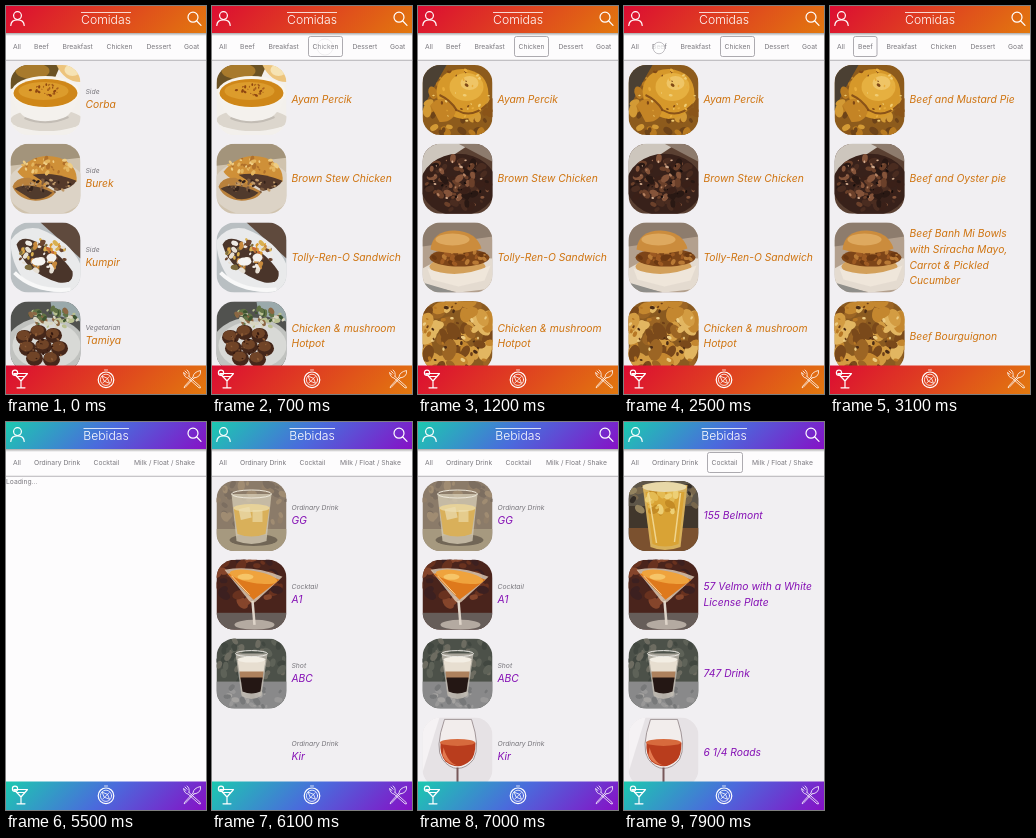
These frames come from a looping animation (200 by 388 pixels, 8000 ms). An HTML page:

```html
<!DOCTYPE html>
<html lang="es">
<head>
<meta charset="utf-8">
<title>Comidas y bebidas</title>
<style>
html, body { margin: 0; width: 100%; height: 100%; overflow: hidden; background: #fdfcfd; }
svg { display: block; width: 100%; height: 100%; }
text { font-family: Inter, Lato, sans-serif; }
.cat { font-size: 6.75px; fill: #7b797f; }
.kind { font-size: 6.8px; font-style: italic; fill: #77757b; }
.name { font-size: 10.3px; font-style: italic; }
.food .name { fill: #cf7410; }
.drink .name { fill: #8510b5; }
.title { font-size: 12.2px; font-weight: 300; fill: #fff; text-anchor: middle; }
.icon { fill: none; stroke: #fff; stroke-width: 1.2; stroke-linecap: round; stroke-linejoin: round; }
.fine { stroke-width: .8; }
</style>
</head>
<body>
<svg id="stage" viewBox="0 0 200 388"></svg>
<script>
const LOOP = 8000;
const stage = document.getElementById('stage');

// Drawing helpers
const oval = (x, y, rx, ry, fill, extra = '') =>
  `<ellipse cx="${x}" cy="${y}" rx="${rx}" ry="${ry}" fill="${fill}" ${extra}/>`;
const shape = (d, fill, extra = '') => `<path d="${d}" fill="${fill}" ${extra}/>`;
const line = (d, color, width = 1) => shape(d, 'none', `stroke="${color}" stroke-width="${width}"`);
const box = (x, y, w, h, fill, extra = '') =>
  `<rect x="${x}" y="${y}" width="${w}" height="${h}" fill="${fill}" ${extra}/>`;
const label = (cls, x, y, text) => `<text class="${cls}" x="${x}" y="${y}">${text.replace(/&/g, '&amp;')}</text>`;

function random(seed) {
  return () => (seed = (seed * 16807) % 2147483647) / 2147483647;
}

// Seeded bits of food scattered inside an ellipse
function scatter(count, x, y, rx, ry, size, colors, seed = 7) {
  const rnd = random(seed * 7919);
  let out = '';
  for (let i = 0; i < count; i++) {
    const a = rnd() * Math.PI * 2, d = Math.sqrt(rnd()), s = size * (.5 + rnd());
    const cx = (x + Math.cos(a) * d * rx).toFixed(1), cy = (y + Math.sin(a) * d * ry).toFixed(1);
    out += oval(cx, cy, s, s * .65, colors[i % colors.length],
      `transform="rotate(${Math.round(rnd() * 180)} ${cx} ${cy})"`);
  }
  return out;
}

// Thumbnails, each 70 by 70
const pictures = {
  soup: () => box(0, 0, 70, 70, '#f3f0ec') + shape('M0 0H50L44 14L0 24Z', '#6b5224') +
    oval(22, 6, 17, 8, '#a87a2c') + shape('M46 0H70V17Q54 17 46 0Z', '#edc47c') + oval(62, 5, 8, 6, '#f6e3b4') +
    oval(36, 55, 36, 11, '#dcd6cd') + shape('M1 27Q6 58 35 58Q63 58 69 27Z', '#f4f1ed') +
    oval(35, 27, 34, 16, '#f8f4ec') + oval(35, 28, 32, 14, '#cf8718') + oval(33, 26, 25, 9, '#dc9c2c') +
    scatter(26, 34, 25, 15, 6, 1.3, ['#8d4510', '#a9611a'], 3) + line('M14 53Q36 62 58 52', '#c3bdb5', 2),
  burek: () => box(0, 0, 70, 70, '#d0c3ae') + shape('M0 0H70V14L0 22Z', '#a3947b') +
    oval(36, 44, 40, 28, '#dcd3c6') +
    shape('M7 28Q24 7 49 14Q68 22 66 38L34 42Q14 38 7 28Z', '#cf9038') +
    shape('M22 31Q42 27 66 37Q62 45 47 47Z', '#54392a') +
    shape('M2 43Q5 33 19 34L45 48Q42 56 25 57Q8 56 2 43Z', '#b9813c') +
    shape('M4 45Q18 37 42 49Q33 57 20 55Z', '#503a2c') +
    scatter(34, 36, 22, 25, 8, 2.2, ['#e4b55f', '#b0702a', '#efcd83'], 5) +
    scatter(34, 36, 42, 25, 7, 1.8, ['#7c5a3e', '#35231b', '#c09a6a'], 8),
  kumpir: () => box(0, 0, 70, 70, '#b9bfc2') + shape('M30 0H70V36Z', '#5f4a3d') +
    shape('M0 18Q10 3 28 6Q60 18 70 42V66Q40 76 14 58Q0 40 0 18Z', '#e9eaeb') +
    shape('M6 22Q10 14 20 17Q48 27 62 49Q64 62 48 60Q14 50 6 22Z', '#4a352a') +
    scatter(65, 33, 33, 24, 16, 2.5, ['#c98a3c', '#e7e0d4', '#7b6a3d', '#d9b050', '#6b4630', '#efebe4'], 9) +
    oval(28, 39, 7, 4, '#f5f4f1') + oval(41, 35, 5, 4, '#f2f0ec') +
    scatter(10, 42, 24, 8, 7, 2, ['#c96b35', '#db9c2d'], 4) + line('M4 50Q24 70 60 67', '#f8f8f8', 4),
  falafel: () => box(0, 0, 70, 70, '#51524f') + shape('M40 0H70V20L42 13Z', '#9aa9ab') +
    oval(35, 45, 40, 29, '#c0c2bf') + oval(36, 44, 34, 24, '#d8d9d6') +
    scatter(60, 43, 16, 25, 10, 2.8, ['#627345', '#3f5531', '#b9c090', '#d8d5c0', '#8b6743'], 12) +
    [[14, 36], [28, 31], [43, 34], [17, 47], [33, 45], [49, 47], [24, 57], [41, 58]].map(([x, y]) =>
      oval(x, y, 8.5, 7.5, '#45271a') + oval(x - 1, y - 2, 6.5, 5, '#704427')).join('') +
    scatter(35, 32, 45, 24, 15, 1.2, ['#8c5b36', '#35190f'], 2),
  roast: () => box(0, 0, 70, 70, '#8d5b1c') + shape('M0 0H24L8 28L0 46Z', '#4b4033') +
    scatter(50, 36, 42, 38, 34, 5, ['#b87a20', '#8a5418', '#d39a35', '#6d4318'], 10) +
    shape('M14 26Q16 5 40 4Q66 6 66 30Q62 52 40 54Q16 50 14 26Z', '#d6982a') +
    oval(44, 22, 17, 14, '#e6b040') + oval(47, 18, 9, 7, '#efc566') +
    shape('M8 40Q20 26 34 43Q32 58 17 57Z', '#c48425') + line('M17 30Q28 35 34 45Q49 54 64 40', '#8a5318', 2) +
    scatter(34, 38, 30, 30, 28, 1.5, ['#f0cd74', '#7f4815', '#e9ad3b'], 19),
  stew: () => box(0, 0, 70, 70, '#5a4032') + shape('M0 0H48L0 32Z', '#cdc6bd') + shape('M36 0H70V18Z', '#8d7b6d') +
    oval(36, 41, 38, 31, '#38211a') +
    scatter(95, 36, 40, 33, 27, 3.6, ['#4a2c20', '#6b402a', '#291813', '#85543a', '#3a2018'], 15) +
    scatter(28, 34, 36, 28, 22, 1.3, ['#b58262', '#d0a98c', '#160d0b'], 6),
  sandwich: () => box(0, 0, 70, 70, '#b3a08e') + shape('M0 0H70V14L0 24Z', '#8d7c6d') +
    shape('M0 46L22 34L70 36V66L36 70L0 62Z', '#e4dbd0') + shape('M0 60L34 70H0Z', '#8f8e8a') +
    oval(35, 44, 28, 9, '#d3a05a') + oval(37, 35, 30, 9, '#7d4518') +
    scatter(30, 37, 35, 28, 7, 2.8, ['#9d5a22', '#6b3812', '#b97a35'], 16) +
    shape('M8 27Q10 8 32 8Q54 9 59 26Q36 35 8 27Z', '#cb8c3d') + oval(30, 17, 17, 6, '#dea95f') +
    shape('M5 46Q34 58 68 43L62 58L36 64L9 57Z', '#efe6da'),
  hotpot: () => box(0, 0, 70, 70, '#8a5a20') +
    scatter(65, 35, 35, 40, 38, 8, ['#d39c42', '#9c6524', '#e2b661', '#7a491a', '#c4872f'], 31) +
    scatter(45, 35, 35, 38, 38, 2, ['#6d3f17', '#eccb82', '#b87825', '#4b2b14'], 17),
  crust: () => box(0, 0, 70, 70, '#737473') + shape('M0 40L40 70H0Z', '#3c5264') + box(0, 0, 70, 10, '#a9b0b3') +
    shape('M0 14Q25 -2 70 8V46Q50 67 20 57L0 40Z', '#dcdad5') +
    shape('M0 14Q32 -1 70 12V31Q43 38 22 34L0 36Z', '#d3a869') +
    scatter(50, 34, 20, 36, 13, 3.2, ['#e4c591', '#c09050', '#eed7ad'], 21) +
    oval(46, 38, 20, 11, '#35241e') +
    scatter(30, 46, 39, 18, 9, 2.6, ['#62402f', '#27170f', '#8a5f46', '#94513a'], 11) +
    line('M20 61Q46 63 68 46', '#eceae6', 4),
  pie: () => box(0, 0, 70, 70, '#66594c') + shape('M0 0H70V14L0 20Z', '#b39d80') +
    oval(35, 37, 35, 31, '#8f673a') + oval(35, 35, 33, 28, '#cd9c57') + oval(35, 34, 29, 24, '#bd8845') +
    scatter(40, 33, 31, 27, 22, 2.3, ['#cda25f', '#b07a38'], 3) +
    shape('M36 30L66 45Q58 60 39 64Z', '#3b251c') +
    scatter(24, 49, 49, 9, 11, 2.3, ['#5d3826', '#7a4f38', '#24140f'], 14) + line('M36 30L66 45M36 30L39 64', '#d8b273', 1.5),
  bowl: () => box(0, 0, 70, 70, '#d3cfc8') + shape('M0 0H50L0 24Z', '#c2995c') +
    scatter(20, 28, 6, 26, 6, 3, ['#dc9b35', '#8d6a38', '#e9d5ac'], 13) +
    oval(36, 42, 37, 28, '#4c6687') + oval(36, 41, 34, 25, '#e3dfd8') +
    scatter(55, 31, 32, 23, 14, 2.8, ['#6d4830', '#8e5f3d', '#40291d', '#c69a6d', '#efe7da'], 5) +
    scatter(34, 18, 36, 13, 9, 2.5, ['#d5803b', '#e6a45a', '#b8622c'], 20) +
    scatter(26, 55, 44, 11, 13, 3.6, ['#a7b37a', '#d5d9b2', '#78915a'], 8) +
    scatter(45, 33, 54, 18, 8, 2, ['#f7f4ee', '#d5cdbf'], 23),
  casserole: () => box(0, 0, 70, 70, '#54443a') + shape('M0 46L20 70H0Z', '#c3b29b') + shape('M0 0H34L0 18Z', '#9c8468') +
    oval(54, 8, 13, 7, '#a98054') + shape('M3 32Q5 66 35 67Q66 66 68 32Z', '#d0c3b1') +
    oval(35, 34, 33, 24, '#e0d5c4') + oval(35, 34, 29, 20, '#3f271c') +
    scatter(60, 35, 34, 27, 18, 3.2, ['#62402c', '#2b1a13', '#83583a', '#b58e60', '#4a2c1f'], 25) +
    [[24, 27], [44, 24], [48, 39]].map(([x, y]) => oval(x, y, 4, 5, '#cda668')).join(''),
  tumbler: () => box(0, 0, 70, 70, '#8b7b69') + scatter(45, 35, 24, 38, 25, 4, ['#927f69', '#7c6e60', '#a08c72'], 2) +
    box(0, 48, 70, 22, '#a6997f') + oval(37, 59, 24, 6, '#716656') +
    shape('M15 13H55L50 60Q35 66 20 60Z', '#d4cab3', 'opacity=".8"') + shape('M17 26H53L49 53Q35 58 21 53Z', '#d9b05a') +
    oval(35, 27, 18, 4, '#e7d299') + box(23, 27, 11, 11, '#eddfb3', 'opacity=".7" transform="rotate(-12 28 32)"') +
    box(36, 29, 10, 12, '#eee0af', 'opacity=".6"') + oval(35, 13, 20, 4, 'none', 'stroke="#eee8da"'),
  martini: () => box(0, 0, 70, 70, '#4a241c') + scatter(36, 34, 20, 38, 24, 5, ['#69321f', '#3c2020', '#85452b'], 18) +
    box(0, 53, 70, 17, '#665d59') + oval(38, 65, 20, 5, '#b4aaa1') + line('M36 41L38 65', '#ded4c9', 2.5) +
    shape('M8 10Q37 5 66 17L39 42Q35 45 31 39Z', '#eadbc4', 'opacity=".75"') +
    shape('M11 14Q37 9 63 20L37 40Z', '#de791c') + oval(37, 17, 24, 6, '#efa33d', 'transform="rotate(10 37 17)"') +
    oval(29, 17, 8, 3, '#f6c568') + line('M15 16L33 35', '#f7d29b'),
  shot: () => box(0, 0, 70, 70, '#4c5149') + scatter(48, 35, 22, 38, 23, 4, ['#5e6258', '#414740', '#6d6c61'], 22) +
    box(0, 43, 70, 27, '#89898a') + scatter(32, 35, 57, 36, 12, 3, ['#999898', '#777879', '#a5a3a1'], 4) +
    shape('M19 15H51L45 57Q35 64 25 57Z', '#c9c2b7', 'opacity=".75"') + shape('M21 22H49L47 34H23Z', '#e7ded0') +
    shape('M23 33H47L46 41H24Z', '#ad815d') + shape('M24 39H46L44 53Q35 57 26 53Z', '#241714') +
    oval(35, 21, 14, 3, '#f3eee4') + oval(35, 15, 16, 3, 'none', 'stroke="#e9e7e2"'),
  wine: () => box(0, 0, 70, 70, '#e6e2e5') + shape('M0 0H17L0 55Z', '#f5f2f4') +
    shape('M22 2Q12 31 20 42Q27 51 35 51Q44 51 51 42Q58 29 49 2Z', '#f2edec', 'stroke="#8e8285" stroke-width=".8"') +
    shape('M18 25H53Q53 38 48 43Q36 54 23 44Q17 37 18 25Z', '#b93d1d') + oval(35, 25, 17.5, 3.5, '#d76a3d') +
    shape('M21 30Q26 47 36 48Q24 47 20 38Z', '#e37a50') + line('M35 50V70', '#78585a', 2),
  highball: () => box(0, 0, 70, 70, '#41372c') + box(0, 0, 70, 25, '#5d5548') +
    scatter(24, 35, 15, 38, 17, 4, ['#77664b', '#332c26', '#94835f'], 24) + box(0, 47, 70, 23, '#7b512f') +
    shape('M14 4H59L52 66Q36 72 22 66Z', '#d7b05b') + shape('M17 11H56L50 63Q36 68 24 63Z', '#d9a335') +
    scatter(24, 36, 20, 17, 13, 4, ['#edcf75', '#e4bb53', '#c48b25'], 9) + oval(36, 6, 22, 5, '#e8d8a8') +
    line('M20 12L28 62M52 12L46 61', '#f0d58d', 1.5)
};

// A list takes over its text at once; its pictures arrive one by one
const themeEnd = { food: 5300, drink: LOOP };
const lists = [
  { from: 0, to: 700, load: -400, unload: 900, theme: 'food', items: [
    ['soup', 'Corba', 'Side'], ['burek', 'Burek', 'Side'], ['kumpir', 'Kumpir', 'Side'], ['falafel', 'Tamiya', 'Vegetarian']] },
  { from: 700, to: 3100, load: 900, unload: 4000, theme: 'food', items: [
    ['roast', 'Ayam Percik'], ['stew', 'Brown Stew Chicken'], ['sandwich', 'Tolly-Ren-O Sandwich'],
    ['hotpot', 'Chicken & mushroom|Hotpot']] },
  { from: 3100, to: 5300, load: 4000, unload: 5300, theme: 'food', items: [
    ['crust', 'Beef and Mustard Pie'], ['pie', 'Beef and Oyster pie'],
    ['bowl', 'Beef Banh Mi Bowls|with Sriracha Mayo,|Carrot & Pickled|Cucumber'], ['casserole', 'Beef Bourguignon']] },
  { from: 5900, to: 7700, load: 5900, unload: 7900, theme: 'drink', items: [
    ['tumbler', 'GG', 'Ordinary Drink'], ['martini', 'A1', 'Cocktail'], ['shot', 'ABC', 'Shot'], ['wine', 'Kir', 'Ordinary Drink']] },
  { from: 7700, to: LOOP, load: 7900, unload: LOOP, theme: 'drink', items: [
    ['highball', '155 Belmont'], ['martini', '57 Velmo with a White|License Plate'], ['shot', '747 Drink'], ['wine', '6 1/4 Roads']] }
];

const during = (from, to, content, cls = '') => `<g class="${cls}" data-from="${from}" data-to="${to}">${content}</g>`;

function listMarkup({ from, to, load, unload, theme, items }) {
  return items.map(([picture, name, kind], i) => {
    const top = 59 + i * 78.8, lines = name.split('|');
    const end = Math.min(unload + i * 100, themeEnd[theme]);
    const first = kind ? top + 43 : top + 38.2 - (lines.length - 1) * 7.8;
    const words = (kind ? label('kind', 79.5, top + 29, kind) : '') +
      lines.map((part, n) => label('name', 79.5, first + n * 15.6, part)).join('');
    return during(load + i * 100, end,
      `<g transform="translate(4.5 ${top})" clip-path="url(#thumb)">${pictures[picture]()}</g>`) +
      during(from, to, words, theme);
  }).join('');
}

const categories = entries => entries.map(([x, text]) => label('cat', x, 43, text)).join('');
const selection = (from, to, x, w) =>
  during(from, to, box(x, 30.5, w, 20, 'none', 'rx="2" stroke="#98969c" stroke-width=".8"'));

const bars = (theme, title, x1, x2) =>
  box(0, 0, 200, 27, `url(#${theme})`) +
  `<g transform="translate(0 359.5)">${box(0, 0, 200, 29, `url(#${theme})`)}</g>` +
  line(`M${x1} 6.5H${x2}`, '#fff', .8) + label('title', 100, 18, title);

const gradient = (id, colors) =>
  `<linearGradient id="${id}" gradientUnits="userSpaceOnUse" x1="43" y1="-43" x2="157" y2="70">` +
  colors.map((c, i) => `<stop offset="${i / (colors.length - 1)}" stop-color="${c}"/>`).join('') + '</linearGradient>';

const icons = `<g class="icon">
  <circle cx="11.5" cy="9.6" r="3.9"/><path d="M4.8 19.5Q5 13.8 11.5 13.8Q18 13.8 18.2 19.5"/>
  <circle cx="187" cy="11.2" r="5"/><path d="M190.8 15L195 19.3"/>
  <path d="M8 367.5H21.5L15 375ZM15 375V381.5M11 381.8H19M10.5 370.5H19"/><circle cx="9" cy="366.8" r="2.6"/>
  <circle cx="100" cy="373.8" r="7.8"/>
  <g class="fine">
    <circle cx="100" cy="373.8" r="5.6"/>
    <path d="M98.5 364H101.5M96.5 370.3L101.5 372.3L103.5 377.3L98.5 375.3ZM97 376.8L103 370.8"/>
    <path d="M183 370.5L194.2 380.5Q195.2 382.6 193 381.8L182 372Q178.5 371.5 177.5 366.5L180 368.5M179 365L181.2 367.2M181 364Q184 366 183 370.5"/>
    <path d="M188 372L179 381.5Q177.6 382.4 178.6 380.3L187 371Q187.5 366 194.5 364.5Q195.5 371 188 372Z"/>
  </g>
</g>`;

stage.innerHTML = `<defs>
  <clipPath id="thumb"><rect width="70" height="70" rx="18"/></clipPath>
  ${gradient('food', ['#dc0c32', '#df4220', '#e2780e'])}
  ${gradient('drink', ['#1cc9b0', '#4a6bdc', '#8611c6'])}
  <linearGradient id="shade" x2="0" y2="1"><stop stop-color="#555" stop-opacity=".5"/><stop offset="1" stop-color="#555" stop-opacity="0"/></linearGradient>
  </defs>` +
  box(0, 0, 200, 388, '#f1eff2') +
  during(5300, 5900, box(0, 54, 200, 306, '#fdfcfd') + label('cat', 0, 62, 'Loading...')) +
  lists.map(listMarkup).join('') +
  box(0, 27, 200, 27, '#fdfcfd') + box(0, 53.8, 200, .8, '#a5a3a7') + box(0, 27, 200, 3, 'url(#shade)') +
  during(0, 5300, categories([[7, 'All'], [28, 'Beef'], [56.5, 'Breakfast'], [100.5, 'Chicken'], [140.5, 'Dessert'], [178, 'Goat']]) +
    bars('food', 'Comidas', 75, 125)) +
  during(5300, LOOP, bars('drink', 'Bebidas', 77.5, 123)) +
  during(5400, LOOP, categories([[7, 'All'], [28, 'Ordinary Drink'], [87.5, 'Cocktail'], [128, 'Milk / Float / Shake']])) +
  selection(600, 2800, 96.5, 34) + selection(2800, 5300, 23.5, 23.5) + selection(7600, LOOP, 83.5, 35) +
  icons + '<circle id="tap" fill="#fff" fill-opacity=".75" stroke="#b5b3b8" stroke-width=".8"/>';

const timed = [...stage.querySelectorAll('[data-from]')];
const tapMark = document.getElementById('tap');
const taps = [[400, 113, 41], [2500, 35, 42], [5000, 14, 373], [7400, 101, 41]];
const TAP_TIME = 400;

function render(t) {
  for (const node of timed) {
    node.style.display = t >= +node.dataset.from && t < +node.dataset.to ? '' : 'none';
  }
  const tap = taps.find(([start]) => t >= start && t < start + TAP_TIME);
  tapMark.style.display = tap ? '' : 'none';
  if (tap) {
    const p = (t - tap[0]) / TAP_TIME;
    tapMark.setAttribute('cx', tap[1]);
    tapMark.setAttribute('cy', tap[2]);
    tapMark.setAttribute('r', 5.8 + 3 * p);
    tapMark.setAttribute('opacity', 1 - p);
  }
}

const began = performance.now();
function tick() {
  render((performance.now() - began) % LOOP);
  requestAnimationFrame(tick);
}
tick();
</script>
</body>
</html>
```
